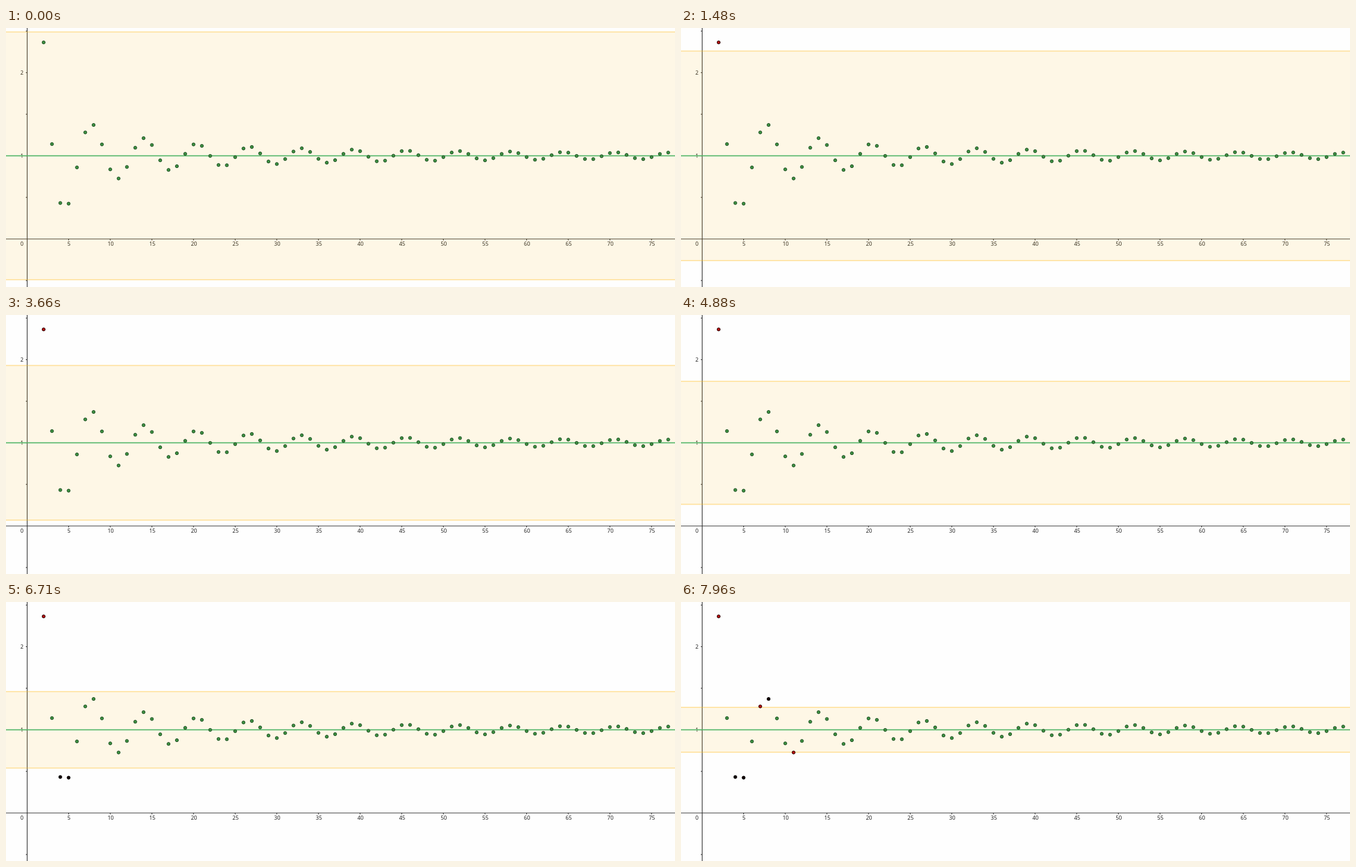
Recreate the animation shown at these times as an HTML page. Size 1116 by 433 pixels, loop 8 s.

```html
<!DOCTYPE html>
<html lang="en">
<head>
<meta charset="utf-8">
<title>Convergence band</title>
<style>
  html, body { margin: 0; width: 100%; height: 100%; overflow: hidden; background: #fefefe; }
  svg { display: block; width: 1116px; height: 433px; }
  text { font: 9px "Noto Sans", "Open Sans", sans-serif; fill: #222; text-anchor: middle; }
</style>
</head>
<body>
<svg id="stage" viewBox="0 0 1116 433"></svg>
<script>
const LOOP = 8000, WIDTH = 1116, HEIGHT = 433;
const ORIGIN_X = 35, UNIT_X = 13.892;
const LIMIT_Y = 213.67, UNIT_Y = 139, AXIS_Y = LIMIT_Y + UNIT_Y;

// The band narrows in hundredths, redrawn about twelve times a second
const START_EPS = 1.49, STEP_MS = 82.9, HUNDREDTHS_PER_STEP = 1.27;
const EDGE = 1.7, BAND_COLOR = "#ffb818";

const stage = document.getElementById("stage");
const px = n => ORIGIN_X + n * UNIT_X;
const py = v => LIMIT_Y - (v - 1) * UNIT_Y;

function add(tag, attrs, text) {
  const node = document.createElementNS("http://www.w3.org/2000/svg", tag);
  for (const key in attrs) node.setAttribute(key, attrs[key]);
  if (text !== undefined) node.textContent = text;
  return stage.appendChild(node);
}
const line = (x1, y1, x2, y2, stroke, width = 1) =>
  add("line", { x1, y1, x2, y2, stroke, "stroke-width": width });
const strip = (opacity, height = 0) =>
  add("rect", { x: 0, width: WIDTH, height, fill: BAND_COLOR, "fill-opacity": opacity });

// Axes, ticks and labels
line(ORIGIN_X + 0.3, 0, ORIGIN_X + 0.3, HEIGHT, "#111");
line(0, AXIS_Y + 0.1, WIDTH, AXIS_Y + 0.1, "#333");
for (let v = -0.5; v <= 2.5; v += 0.5) if (v) line(33, py(v), 35, py(v), "#222");
for (let n = 5; n <= 75; n += 5) {
  line(px(n), AXIS_Y, px(n), AXIS_Y + 2.5, "#222");
  add("text", { x: px(n) + 0.7, y: 364 }, n);
}
add("text", { x: 26.7, y: 364 }, 0);
for (const v of [1, 2]) add("text", { x: 26.7, y: py(v) + 3 }, v);

// Tolerance band and limit
const band = strip(0.1);
const edges = [-1, 1].map(side => ({ side, node: strip(0.4, EDGE) }));
line(0, LIMIT_Y, WIDTH, LIMIT_Y, "#4fb567", EDGE);

// Terms of 1 + 3 sin(n) / n
const points = [];
for (let n = 2; n <= 77; n++) {
  const offset = 3 * Math.sin(n) / n;
  const node = add("circle", { cx: px(n), cy: py(1 + offset), r: 2.6, "stroke-width": 1 });
  points.push({ n, distance: Math.abs(offset), node });
}

function epsilonAt(t) {
  const step = Math.floor(t / STEP_MS + 0.2);
  return START_EPS - Math.round(step * HUNDREDTHS_PER_STEP) / 100;
}

// Points turn red on leaving the band, then black; the first stays red
function pointColors({ n, distance }, eps) {
  const excess = distance - eps;
  if (excess <= 0) return ["#3e9143", "#1d4a20"];
  return n === 2 || excess < 0.04 ? ["#b40f0f", "#210000"] : ["#160404", "#000"];
}

function draw(t) {
  const eps = epsilonAt(t);
  const half = eps * UNIT_Y;
  band.setAttribute("y", LIMIT_Y - half);
  band.setAttribute("height", 2 * half);
  for (const { side, node } of edges) node.setAttribute("y", LIMIT_Y + side * half - EDGE / 2);
  for (const point of points) {
    const [fill, stroke] = pointColors(point, eps);
    point.node.setAttribute("fill", fill);
    point.node.setAttribute("stroke", stroke);
  }
}

const began = performance.now();
function tick() {
  draw((performance.now() - began) % LOOP);
  requestAnimationFrame(tick);
}
tick();
</script>
</body>
</html>
```
